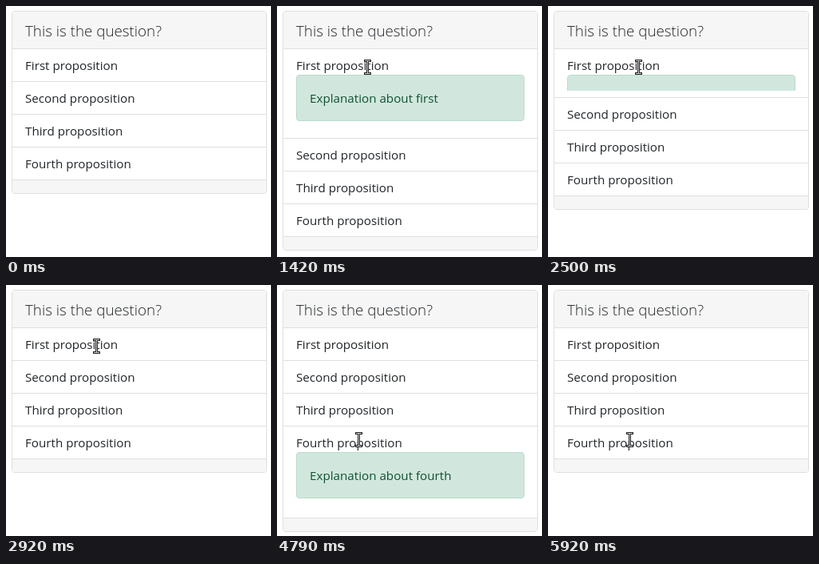
Write an HTML page that moves like this. It is 332 px wide and 314 px high and loops after 6 s.

```html
<!DOCTYPE html>
<html lang="en">
<head>
<meta charset="utf-8">
<title>Quiz card</title>
<style>
  * { box-sizing: border-box; }
  html, body { margin: 0; width: 100%; height: 100%; overflow: hidden; background: #fff; }
  body { position: relative; color: #212529; font: 15.2px/24px "Open Sans", "Noto Sans", sans-serif; }
  .card { position: absolute; left: 7px; top: 6px; width: 320px; border: 1px solid #dfdfdf; border-radius: 4px; overflow: hidden; }
  .title { height: 47px; padding: 9px 16px 7px; background: #f6f6f6; border-bottom: 1px solid #dfdfdf; font-size: 18.8px; font-weight: 300; line-height: 30px; }
  .row { padding: 8px 16px; border-bottom: 1px solid #dfdfdf; }
  .footer { height: 16px; background: #f6f6f6; }
  .collapse { height: 0; overflow: hidden; }
  .alert { height: 58px; padding: 16px; color: #0f5132; background: #d1e7dd; border: 1px solid #badbcc; border-radius: 4px; }
  #cursor { position: absolute; left: -8px; top: -12px; fill: none; }
</style>
</head>
<body>
<div class="card">
  <div class="title">This is the question?</div>
  <div class="row">First proposition
    <div class="collapse" id="first"><div class="alert">Explanation about first</div></div>
  </div>
  <div class="row">Second proposition</div>
  <div class="row">Third proposition</div>
  <div class="row">Fourth proposition
    <div class="collapse" id="fourth"><div class="alert">Explanation about fourth</div></div>
  </div>
  <div class="footer"></div>
</div>
<svg id="cursor" width="17" height="25" viewBox="-8 -12 17 25">
  <path id="beam" d="M-4 -7.5H5M.5 -7.5V8.5M-4 8.5H5" stroke="#222" stroke-width="3"/>
  <path d="M-3 -7.5H4M.5 -7.5V8.5M-3 8.5H4" stroke="#ccc"/>
</svg>
<script>
const LOOP = 6000, OPEN_HEIGHT = 74, TRANSITION = 350;
const TICKS = [0, 90, 210, 290, 420]; // uneven 10 fps cadence, repeating every 500 ms
const $ = id => document.getElementById(id);
const clamp = v => Math.min(1, Math.max(0, v));
const smooth = v => v * v * (3 - 2 * v);

// CSS "ease": cubic-bezier(.25, .1, .25, 1)
function ease(x) {
  if (x <= 0 || x >= 1) return clamp(x);
  let lo = 0, hi = 1, s;
  for (let i = 0; i < 20; i++) {
    s = (lo + hi) / 2;
    if (.75 * s * (1 - s) + s ** 3 < x) lo = s; else hi = s;
  }
  return .3 * s * (1 - s) ** 2 + 3 * s * s * (1 - s) + s ** 3;
}

function toggle(id, t, openAt, closeAt) {
  const shown = ease((t - openAt) / TRANSITION) - ease((t - closeAt) / TRANSITION);
  $(id).style.height = Math.round(OPEN_HEIGHT * shown) + "px";
}

function draw(now) {
  const ms = now % LOOP;
  const tick = TICKS.filter(start => start <= ms % 500).length - 1;
  const t = Math.floor(ms / 500) * 500 + tick * 100;

  toggle("first", t, 1133, 2348);
  toggle("fourth", t, 4180, 5150);

  const enter = smooth(clamp(t / 700));
  const descend = smooth(clamp((t - 3300) / 600));
  const x = Math.round(-8 + 121 * enter - 11 * descend);
  const y = Math.round(193 - 117 * enter + 117 * descend);
  $("cursor").style.transform = `translate(${x}px, ${y}px)`;
}

const begin = performance.now();
function loop() {
  draw(performance.now() - begin);
  requestAnimationFrame(loop);
}
loop();
</script>
</body>
</html>
```
